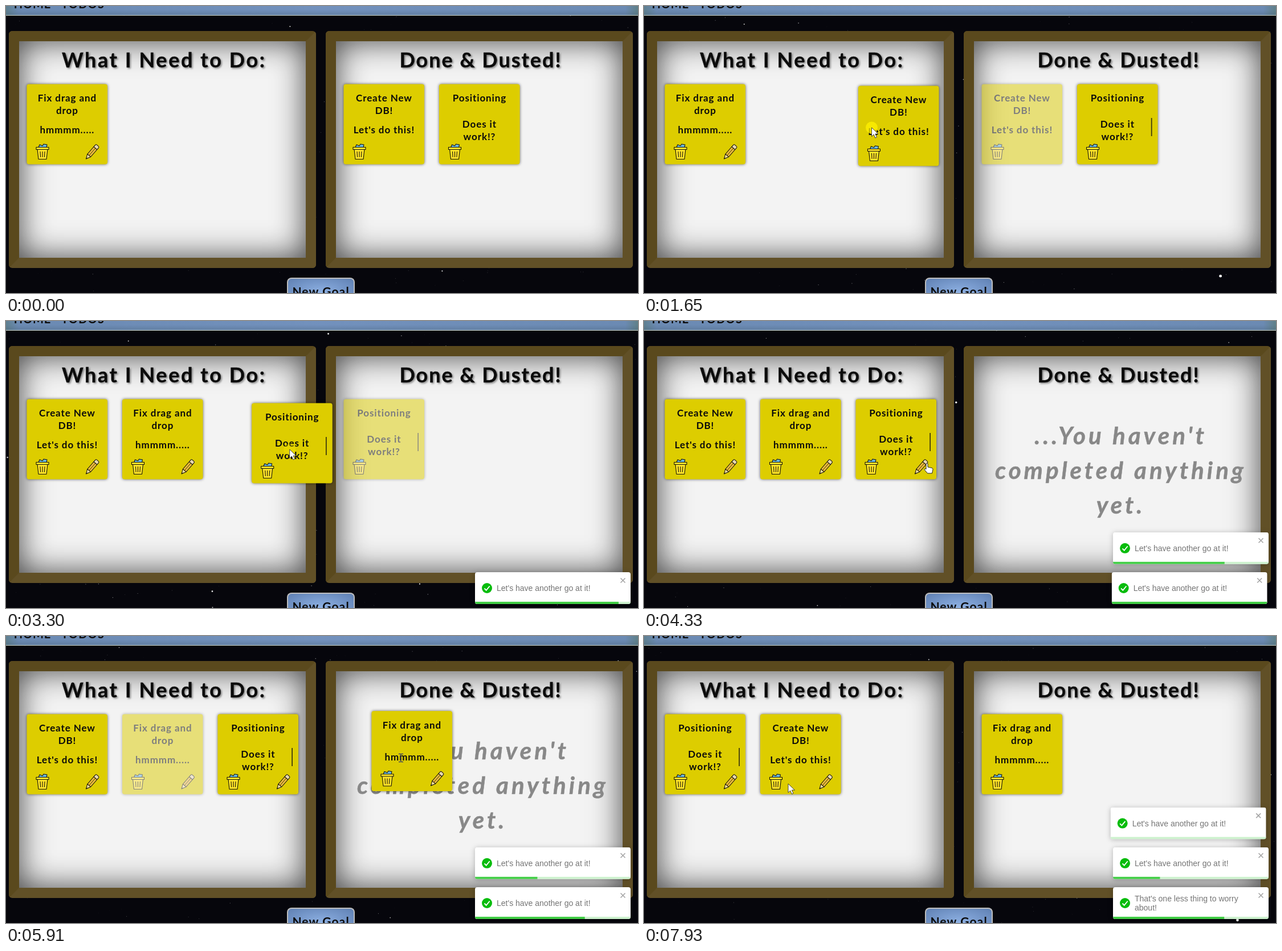
An HTML page with a canvas for the animation above (8000 ms loop, 1109 px wide and 505 px high).

```html
<!DOCTYPE html>
<html lang="en">
<head>
<meta charset="utf-8">
<title>Todo boards</title>
<style>
  html, body { margin: 0; width: 100%; height: 100%; overflow: hidden; background: #06060c; }
  canvas, svg, div { position: absolute; box-sizing: border-box; }
  canvas, svg { left: 0; top: 0; display: block; overflow: hidden; }
  .scene { left: 0; top: 0; width: 100%; height: 100%; overflow: hidden; contain: strict; }
  .nav { left: 0; top: 0; width: 1109px; height: 17px; border-bottom: 1px solid #cdd5c8;
    background: linear-gradient(rgba(70, 95, 115, 0) 40%, rgba(70, 95, 115, .3)),
      linear-gradient(90deg, #5f8090, #6b8ab3 2%, #7291bd 50%, #6b8ab3 98%, #5f8088); }
  .board { top: 44px; width: 539px; height: 417px; border: 18px solid; border-radius: 6px;
    border-color: #5a491d #615027 #615027 #5a491d; background: #f3f3f3;
    box-shadow: inset 0 0 55px rgba(0, 0, 0, .75); }
  .button { left: 493px; top: 478px; width: 119px; height: 27px; border: 2px solid #bdbdbd; border-bottom: 0;
    border-radius: 8px 8px 0 0; background: radial-gradient(80px 34px at 50% 23px, #8db0e2, #5f80b3); }
  text { font-family: Lato, "Open Sans", sans-serif; font-weight: 700; text-anchor: middle; fill: #0b0b0b; }
  .heading { filter: drop-shadow(2px 2px 1.5px rgba(0, 0, 0, .4)); stroke: #111; stroke-width: .4; stroke-linejoin: round; }
  .empty { fill: #888; font-style: italic; stroke: #888; stroke-width: .5; stroke-linejoin: round; }
  .note { filter: drop-shadow(0 0 2.5px rgba(0, 0, 0, .6)); }
  .toast { filter: drop-shadow(0 1px 4px rgba(0, 0, 0, .25)); }
  .toast text { font: 14px "Liberation Sans", Arial, sans-serif; fill: #757575; text-anchor: start; }
</style>
</head>
<body>
<div class="scene">
  <canvas id="sky" width="1109" height="505"></canvas>
  <div class="nav"></div>
  <div class="board" style="left:5px"></div>
  <div class="board" style="left:561px"></div>
  <div class="button"></div>
  <svg id="stage" width="1109" height="505" viewBox="0 0 1109 505">
    <defs>
      <clipPath id="toastShape"><rect width="273" height="56" rx="4"/></clipPath>
    </defs>
  </svg>
</div>
<script>
const LOOP = 8000, W = 1109, H = 505;
const stage = document.getElementById('stage');
const sky = document.getElementById('sky').getContext('2d');

function add(markup, parent = stage) {
  const g = document.createElementNS('http://www.w3.org/2000/svg', 'g');
  g.innerHTML = markup;
  return parent.appendChild(g);
}
const show = (el, on) => { el.style.display = on ? '' : 'none'; };
const move = (el, x, y) => el.setAttribute('transform', `translate(${x.toFixed(2)} ${y.toFixed(2)})`);

// Half the tracking is added so that the trailing gap does not shift centred lines.
function label(str, x, y, size, spacing, cls = '') {
  return `<text class="${cls}" x="${x + spacing / 2}" y="${y}" font-size="${size}" letter-spacing="${spacing}">${str}</text>`;
}

add(label('HOME', 46, 3.5, 20, .8) + label('TODOS', 134.5, 3.5, 20, 1.2) +
    label('What I Need to Do:', 276, 107.5, 36, 2.6, 'heading') +
    label('Done &amp; Dusted!', 832, 107.5, 36, 2, 'heading') +
    label('New Goal', 552, 509.5, 21, 1.1));

const empty = add(['...You haven\'t', 'completed anything', 'yet.']
  .map((line, i) => label(line, 834, 216.5 + 61 * i, 42, 5, 'empty')).join(''));

// Notes
const trash = `<g stroke="#15130a" stroke-width="1.1" stroke-linejoin="round">
  <path fill="#69b5dc" d="M20 111l2-5 5 2 2-3 6 1-1 5z"/>
  <path fill="#ffe327" d="M18 114h18l-2 17.5H20z"/>
  <path fill="#ffe327" d="M16 110.500h22v4H16z"/>
  <path fill="none" d="M23 118l.6 10M27 118v10M31 118l-.6 10"/></g>`;
const pencil = `<g class="pencil" transform="translate(103.5 131) rotate(-49)" stroke="#15130a" stroke-linejoin="round">
  <path fill="#f6dfa0" d="M0 0L8-3.800V3.800z"/>
  <path fill="#efbd3c" d="M8-3.800H25V3.800H8z"/>
  <path fill="#e8d9b0" d="M25-3.800h4q2 0 2 2v3.600q0 2-2 2h-4z"/>
  <path fill="none" stroke-width=".8" d="M8 0H25M0 0L3 0"/></g>`;

const texts = {
  fix: { title: ['Fix drag and', 'drop'], body: ['hmmmm.....'], bodyY: 86 },
  create: { title: ['Create New', 'DB!'], body: ["Let's do this!"], bodyY: 86 },
  position: { title: ['Positioning'], body: ['Does it', 'work!?'], bodyY: 75.5, thumb: true }
};

function makeNote({ title, body, bodyY, thumb }) {
  const lines = (list, y) => list.map((s, i) => label(s, 70, y + 22 * i, 17, .9)).join('');
  const el = add(`<rect x="-.5" y="-.5" width="141.500" height="141" rx="4" fill="#ddcd00"/>
    ${lines(title, 30)}${lines(body, bodyY)}${trash}${pencil}
    ${thumb ? '<rect class="thumb" x="129.300" y="59" width="1.700" height="32" fill="#3a360c"/>' : ''}`);
  el.classList.add('note');
  return { el, pencil: el.querySelector('.pencil'), thumb: el.querySelector('.thumb') };
}

const resting = {}, lifted = {};
for (const name in texts) resting[name] = makeNote(texts[name]);
for (const name in texts) lifted[name] = makeNote(texts[name]);

const layouts = [
  { until: 2215, todo: ['fix'], done: ['create', 'position'] },
  { until: 3740, todo: ['create', 'fix'], done: ['position'] },
  { until: 5930, todo: ['create', 'fix', 'position'], done: [] },
  { until: 6950, todo: ['create', 'position'], done: ['fix'] },
  { until: LOOP, todo: ['position', 'create'], done: ['fix'] }
];
const drags = [
  { from: 1100, to: 2215, name: 'create', dx: 23, dy: 73, glow: .75 },
  { from: 2950, to: 3740, name: 'position', dx: 66, dy: 81, glow: .3 },
  { from: 5250, to: 5930, name: 'fix', dx: 51, dy: 82, glow: 0, editable: true },
  { from: 6600, to: 7300, name: 'position', dx: 106.5, dy: 82, glow: .45, editable: true }
];

function placeNote(note, x, y, editable, t) {
  move(note.el, x, y);
  show(note.pencil, editable);
  if (note.thumb) show(note.thumb, t > 600);
}

function drawNotes(t, drag, cursor) {
  const layout = layouts.find(l => t < l.until);
  for (const side of ['todo', 'done']) {
    layout[side].forEach((name, i) => {
      const x = (side === 'todo' ? 37 : 593) + 167.5 * i;
      placeNote(resting[name], x, 138, side === 'todo', t);
      resting[name].el.style.opacity = drag && drag.name === name ? .5 : 1;
    });
  }
  for (const name in lifted) {
    const active = drag && drag.name === name;
    show(lifted[name].el, active);
    if (active) placeNote(lifted[name], cursor.x - drag.dx, cursor.y - drag.dy, !!drag.editable, t);
  }
  show(empty, !layout.done.length);
}

// Toasts
const again = ["Let's have another go at it!"];
const toasts = [
  { enter: 2215, run: 2915, leave: 7920, lines: again },
  { enter: 3760, run: 4440, leave: 9440, lines: again },
  { enter: 5930, run: 6505, leave: 11505, lines: ["That's one less thing to worry", 'about!'] }
];
for (const toast of toasts) {
  const firstY = toast.lines.length > 1 ? 24.5 : 33;
  toast.el = add(`<g clip-path="url(#toastShape)"><rect width="273" height="56" fill="#fff"/>
    <rect y="52" width="273" height="4" fill="#cdf2ce"/>
    <rect class="bar" y="52" width="273" height="4" fill="#42ce46"/></g>
    <circle cx="21" cy="28" r="9" fill="#07bc0c"/>
    <path d="M16.500 28.500l3.200 3.300 6-7.300" fill="none" stroke="#fff" stroke-width="1.800"/>
    <path d="M255.500 10.500l8 8m0-8l-8 8" stroke="#a5a5a5" stroke-width="1.600"/>
    ${toast.lines.map((s, i) => `<text x="38" y="${firstY + 16.5 * i}">${s}</text>`).join('')}`);
  toast.el.classList.add('toast');
  toast.bar = toast.el.querySelector('.bar');
}

const clamp = v => Math.max(0, Math.min(1, v));
const easeOut = p => 1 - (1 - clamp(p)) ** 3;
const bounce = [[0, 3000], [.6, -25], [.75, 10], [.9, -5], [1, 0]];

function bounceIn(p) {
  if (p >= 1) return 0;
  const i = bounce.findIndex(stop => p < stop[0]);
  const [p0, x0] = bounce[i - 1], [p1, x1] = bounce[i];
  return x0 + (x1 - x0) * easeOut((p - p0) / (p1 - p0));
}

function drawToasts(t) {
  toasts.forEach((toast, i) => {
    show(toast.el, t >= toast.enter);
    if (t < toast.enter) return;
    const newer = toasts.slice(i + 1).filter(other => t >= other.enter).length;
    const x = bounceIn((t - toast.enter) / 700) - 20 * easeOut((t - toast.leave) / 140);
    move(toast.el, 823 + x, 442 - 70.2 * newer);
    toast.bar.setAttribute('width', 273 * clamp(1 - (t - toast.run) / 5000));
  });
}

// Cursor
const glow = add('<circle r="10.500" fill="#fff000"/>');
const pointers = {
  arrow: add('<path d="M0 0V15.500l3.700-3.400 2.600 6 2.700-1.200-2.600-5.800H11.500z" fill="#fff" stroke="#333" stroke-width=".9"/>'),
  hand: add('<path d="M-1 0q1.500-1.500 3 0v6l7 1.500q2 .5 2 2.500l-1.500 7H1.500L-4 10.500q0-2 2-1.500l1 1z" fill="#fff" stroke="#222"/>'),
  beam: add('<path d="M-4-7h3l1 1 1-1h3M-4 7h3l1-1 1 1h3M0-6V6" fill="none" stroke="#44485a" stroke-width="1.300"/>')
};
const path = [
  [300, 830, 520], [600, 800, 260], [850, 616, 211], [1100, 616, 211], [1650, 400, 214],
  [2050, 100, 215], [2215, 90, 215], [2750, 659, 219], [2950, 659, 219], [3300, 498, 226],
  [3600, 440, 224], [3740, 435, 222], [4300, 496, 251], [4500, 496, 251], [4950, 255, 220],
  [5250, 255, 220], [5910, 693, 214.5], [6020, 693, 216], [6400, 310, 220], [6600, 310, 220],
  [7080, 130, 232], [7300, 125, 228], [7900, 253, 260], [LOOP, 253, 260]
];

// Cubic through the points, with rest wherever the direction turns back or stops.
function slope(i, axis) {
  const a = path[i - 1], b = path[i], c = path[i + 1];
  if (!a || !c) return 0;
  const before = (b[axis] - a[axis]) / (b[0] - a[0]), after = (c[axis] - b[axis]) / (c[0] - b[0]);
  return before * after > 0 ? 2 * before * after / (before + after) : 0;
}
function along(t, axis) {
  const i = Math.max(1, path.findIndex(k => t < k[0]));
  const a = path[i - 1], b = path[i], d = b[0] - a[0], u = clamp((t - a[0]) / d);
  const s = u * u * (3 - 2 * u);
  return a[axis] + (b[axis] - a[axis]) * s +
    d * u * (1 - u) * (slope(i - 1, axis) * (1 - u) - slope(i, axis) * u);
}

function drawCursor(t, drag, { x, y }) {
  const kind = t > 4200 && t < 4550 ? 'hand'
    : (t > 5850 && t < 5960) || (t > 7000 && t < 7300) ? 'beam' : 'arrow';
  for (const name in pointers) {
    show(pointers[name], t > 300 && name === kind);
    move(pointers[name], x, y);
  }
  move(glow, x, y);
  glow.style.opacity = drag ? drag.glow : 0;
}

// Stars fly outwards from the middle of the stage.
let seed = 11;
const random = () => (seed = seed * 16807 % 2147483647) / 2147483647;
const stars = Array.from({ length: 650 }, () => ({ x: (random() - .5) * W, y: (random() - .5) * H, z: random() }));

function drawSky(t) {
  sky.fillStyle = '#06060c';
  sky.fillRect(0, 0, W, H);
  sky.fillStyle = '#fff';
  for (const star of stars) {
    const z = (star.z + 1 - t / LOOP) % 1 + .06;
    const r = Math.min(2.4, .34 / z);
    sky.globalAlpha = clamp(1.15 - z);
    sky.beginPath();
    sky.arc(W / 2 + star.x / z, H / 2 + star.y / z, r, 0, 7);
    sky.fill();
  }
  sky.globalAlpha = 1;
}

function render(t) {
  const cursor = { x: along(t, 1), y: along(t, 2) };
  const drag = drags.find(d => t >= d.from && t < d.to);
  drawSky(t);
  drawNotes(t, drag, cursor);
  drawToasts(t);
  drawCursor(t, drag, cursor);
}

const start = performance.now();
function tick() {
  render((performance.now() - start) % LOOP);
  requestAnimationFrame(tick);
}
tick();
</script>
</body>
</html>
```
